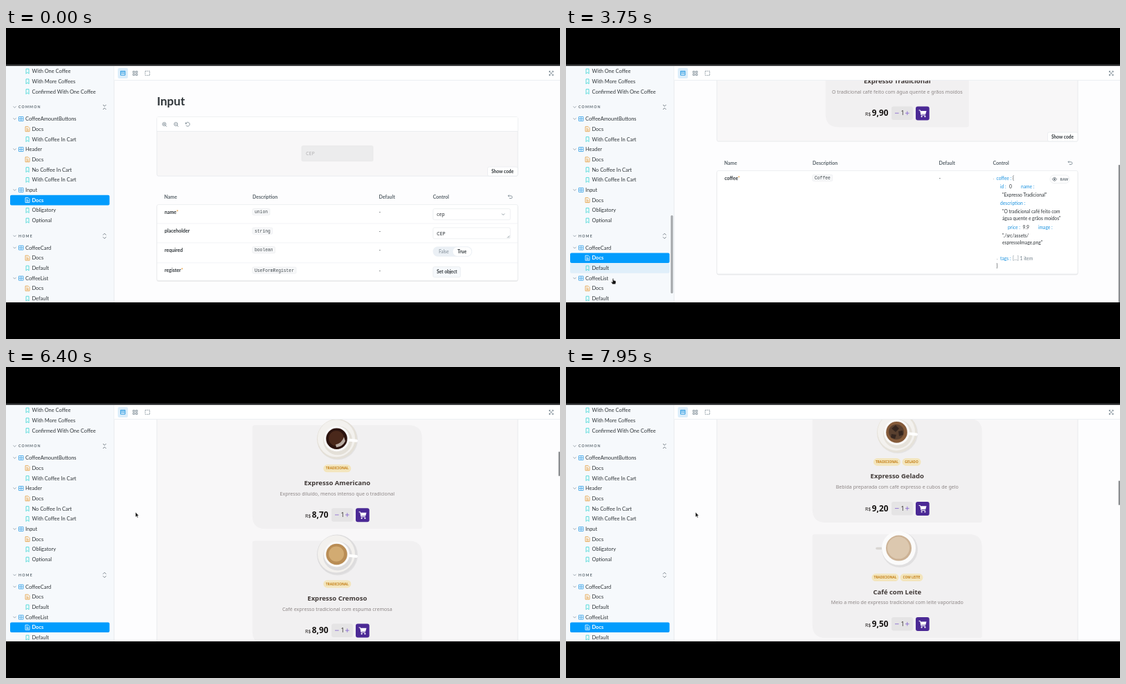
Recreate the animation shown at these times as an HTML page. Size 800 by 450 pixels, loop 8 s.

```html
<!DOCTYPE html>
<html lang="en">
<head>
<meta charset="utf-8">
<title>Component docs</title>
<style>
  html, body { margin: 0; width: 100%; height: 100%; overflow: hidden; background: #000; }
  svg { display: block; width: 100vw; height: 100vh; font-family: Lato, sans-serif; }
  text { white-space: pre; }
  .b { font-weight: 700; }
  .x { font-weight: 800; }
  .noto { font-family: "Noto Sans", sans-serif; }
  .mono { font-family: "Liberation Mono", monospace; }
  .mid { text-anchor: middle; }
  .line { fill: none; stroke-width: .8; }
  .back { fill: none; }
  .hover .back { fill: #e0effa; }
  .old .back { fill: #d0e9f7; }
  .on .back { fill: #029cfd; }
  .on text { fill: #fff; font-weight: 700; }
  .on .line { stroke: #fff; }
</style>
</head>
<body>
<svg id="stage" viewBox="0 0 800 450"></svg>
<script>
const LOOP = 8000;
const INK = '#2e3438', GRAY = '#73828c', BLUE = '#1ea7fd', EDGE = '#e3e6ea';

const rect = (x, y, w, h, fill, extra = '') =>
  `<rect x="${x}" y="${y}" width="${w}" height="${h}" fill="${fill}" ${extra}/>`;
const box = (x, y, w, h, fill, stroke = EDGE, r = 2) =>
  rect(x, y, w, h, fill, `stroke="${stroke}" stroke-width=".6" rx="${r}"`);
// y is the middle of the capital letters
const text = (x, y, s, size, fill = INK, cls = '', extra = '') =>
  `<text x="${x}" y="${y + size * .36}" font-size="${size}" fill="${fill}" class="${cls}" ${extra}>${s}</text>`;
const line = (d, stroke, extra = '') => `<path class="line" d="${d}" stroke="${stroke}" ${extra}/>`;
const circle = (x, y, r, fill, extra = '') => `<circle cx="${x}" cy="${y}" r="${r}" fill="${fill}" ${extra}/>`;
const group = (id, content, extra = '') => `<g id="${id}" ${extra}>${content}</g>`;

// ---- sidebar ----
const icons = {
  story: y => line(`M29 ${y - 3.3}h4v7l-2-2l-2 2z`, '#37d5d3'),
  docs: y => line(`M28 ${y - 3.5}h4l2 2v5h-6zM29.5 ${y - 1}h2M29.5 ${y + .6}h3M29.5 ${y + 2}h3`, '#e69d3c'),
  comp: y => line(`M10.5 ${y - 1.2}l2 2.2l2-2.2`, '#8d98a3') +
    line(`M18.5 ${y - 3}h6.5v6h-6.5zM21.75 ${y - 3}v6M18.5 ${y}h6.5`, '#2f9fe8')
};
const sections = [
  [62.5, ['story With One Coffee', 'story With More Coffees', 'story Confirmed With One Coffee']],
  [131.5, ['comp CoffeeAmountButtons', 'docs Docs', 'story With Coffee In Cart', 'comp Header', 'docs Docs',
    'story No Coffee In Cart', 'story With Coffee In Cart', 'comp Input', 'docs Docs', 'story Obligatory', 'story Optional']],
  [318, ['comp CoffeeCard', 'docs Docs', 'story Default', 'comp CoffeeList', 'docs Docs', 'story Default']]
];
const rows = sections.flatMap(([top, items]) => items.map((item, i) => {
  const cut = item.indexOf(' ');
  return { y: top + i * 14.7, kind: item.slice(0, cut), label: item.slice(cut + 1) };
}));
const INPUT_DOCS = 11, CARD_DOCS = 15, LIST_DOCS = 18;

const rowMarkup = ({ y, kind, label }) => `<g class="row">
  <rect class="back" x="6" y="${y - 7.3}" width="143.5" height="14.6" rx="2"/>
  ${icons[kind](y)}${text(kind == 'comp' ? 28 : 37.5, y, label, 7.46)}</g>`;
const heading = (y, label, open) =>
  line(`M10.5 ${y - 1.2}l2 2.2l2-2.2`, '#8d98a3') +
  text(18, y, label, 5.2, '#5c6870', 'b', 'letter-spacing="1.2"') +
  line(open ? `M140 ${y - 3.5}l2.3 2.3l2.3-2.3M140 ${y + 3.5}l2.3-2.3l2.3 2.3`
    : `M140 ${y - 1.4}l2.3-2.3l2.3 2.3M140 ${y + 1.4}l2.3 2.3l2.3-2.3`, '#5c6870');

const sidebar = rect(0, 55, 156, 342, '#f6f9fc') + rows.map(rowMarkup).join('') +
  heading(114.5, 'COMMON', true) + heading(301, 'HOME', false) +
  rect(151.3, 271, 3.2, 113, '#a6a9ac', 'id="sideThumb" rx="1.6"') + rect(155.7, 55, .7, 342, '#dfe4e9');

const toolbar = rect(156.4, 55, 643.6, 21, '#fff') + rect(156.4, 75.4, 643.6, .7, '#e1e6eb') +
  rect(161.5, 58, 14.5, 15, '#dbedfa', 'rx="2"') +
  line('M165.5 62.3h6.5v6h-6.5zM165.5 67l2-2l1.5 1.3l1.2-1l1.8 1.5M165.5 63.8h6.5', '#1e95e0') +
  line('M183.3 62.5h2.5v2.3h-2.5zM187.3 62.5h2.5v2.3h-2.5zM183.3 66.2h2.5v2.3h-2.5zM187.3 66.2h2.5v2.3h-2.5z', GRAY) +
  line('M201 62.3h6.5v6.3h-6.5z', GRAY, 'stroke-dasharray="1.6 1"') +
  line('M784.5 64.2v-1.8h1.8M790.2 64.2v-1.8h-1.8M784.5 66.8v1.8h1.8M790.2 66.8v1.8h-1.8M784.7 62.6l5.3 5.8M790 62.6l-5.3 5.8', GRAY);

// ---- documentation pages, in unscrolled coordinates ----
const zoom = (x, sign) => circle(x, 151.5, 2.5, 'none', `stroke="${GRAY}" stroke-width=".8"`) +
  line(`M${x + 1.8} 153.4l1.8 1.8M${x - 1.2} 151.5h2.4${sign}`, GRAY);

const page = (title, height, content = '') => {
  const end = 141 + height;
  return text(218, 118.5, title, 17.1, INK, 'b') +
    rect(217.6, 141.4, 521.8, height, '#000', 'opacity=".05" rx="3"') +
    box(218, 141, 521, height, '#f8f7f8') + rect(218.3, 141.3, 520.4, 20.7, '#fff') +
    rect(218, 161.7, 521, .6, EDGE) + zoom(228.5, 'M228.5 150.3v2.4') + zoom(245.3, '') +
    line('M259.3 149v2h2M259.6 150.7a2.9 2.9 0 1 1 .2 2.4', GRAY) + content +
    box(695.5, end - 13, 43.5, 13, '#fff') + text(701, end - 6.6, 'Show code', 6.6, INK, 'b');
};

const pill = (y, s) => box(356, y - 4.6, s.length * 3.8 + 6, 9.2, '#f7f8f9', '#e8eaec', 1.5) +
  text(359, y - .3, s, 6.33, '#444b50', 'mono');
const table = (top, height, lines, args) =>
  [[228.5, 'Name'], [356, 'Description'], [538.5, 'Default'], [616.5, 'Control']]
    .map(([x, s]) => text(x, top - 10.7, s, 7, '#5a646b', 'b')).join('') +
  line(`M725 ${top - 12.7}h4.2a1.8 1.8 0 0 1 0 3.7h-2.4M726.5 ${top - 14.2}l-1.5 1.5l1.5 1.5`, GRAY) +
  rect(217.5, top + .5, 522, height + 1, '#000', 'opacity=".07" rx="3"') +
  box(218, top, 521, height, '#fff') +
  lines.map(y => rect(218, y, 521, .6, '#e9ecef')).join('') +
  args.map(([y, name, type, star]) => text(229, y, name + (star ? '<tspan fill="#e69d3c">*</tspan>' : ''), 7, INK, 'b') +
    pill(y, type) + text(538.5, y + .5, '-', 7)).join('');

const inputPage = page('Input', 85.5,
    box(427, 183, 103, 22, '#ececed', '#e4e4e5', 1.5) + text(433, 194.3, 'CEP', 7.1, '#b3b2b4', 'noto')) +
  table(268, 110, [295, 323, 352], [[278.5, 'name', 'union', 1], [306, 'placeholder', 'string', 0],
    [333.5, 'required', 'boolean', 0], [363, 'register', 'UseFormRegister', 1]]) +
  box(616.7, 274, 111.5, 16, '#fff') + text(622, 282, 'cep', 7, INK, 'noto') +
  line('M716 281l2 2l2-2', GRAY) +
  box(616.7, 301.3, 111.5, 16, '#fff') + text(622, 309.5, 'CEP', 7, INK, 'noto') +
  line('M724 316l3-3M726 316l1-1', GRAY) +
  rect(616.5, 328.7, 56.5, 14.5, '#ebf0f5', 'rx="7"') + box(645, 329.2, 27.5, 13.5, '#fff', '#e8edf2', 6.7) +
  text(625, 336, 'False', 6.6, '#7f8b95') + text(652, 336, 'True', 6.6, INK, 'b') +
  box(616.7, 358, 39.5, 15, '#f6f9fc') + text(622, 365.5, 'Set object', 6.6, INK, 'b');

// ---- coffee cards ----
const coffees = [
  { name: 'Expresso Tradicional', about: 'O tradicional café feito com água quente e grãos moídos', price: '9,90',
    saucer: '#e2ded8', drink: '#35190f', foam: '#70401f' },
  { name: 'Expresso Americano', about: 'Expresso diluído, menos intenso que o tradicional', price: '8,70',
    saucer: '#e4e0d8', drink: '#2b130e', foam: '#4a281b', glare: 1 },
  { name: 'Expresso Cremoso', about: 'Café expresso tradicional com espuma cremosa', price: '8,90',
    saucer: '#dddcdd', drink: '#b98d55', foam: '#d2ab72' },
  { name: 'Expresso Gelado', about: 'Bebida preparada com café expresso e cubos de gelo', price: '9,20',
    saucer: '#e6e2da', drink: '#855b3a', foam: '#59402f', ice: 1, tag: 'GELADO' },
  { name: 'Café com Leite', about: 'Meio a meio de expresso tradicional com leite vaporizado', price: '9,50',
    drink: '#ccb295', foam: '#dcc8af', tag: 'COM LEITE' }
];

const cup = c => c.saucer
  ? circle(479, 21, 29, '#000', 'opacity=".06"') + circle(478, 20, 29, c.saucer) + circle(477, 19, 27, '#f3f1ee') +
    circle(479, 22, 21, c.saucer) +
    `<path d="M492 21l14 1.5" stroke="#fff" stroke-width="4" stroke-linecap="round"/>` +
    circle(477.5, 19.5, 18.5, '#fafafa') + circle(477.5, 19.5, 15.3, c.drink) + circle(477, 19, 11, c.foam) +
    (c.glare ? '<path d="M476 28q9-2 12-11l2 6q-4 8-13 9z" fill="#b9aca3"/>' : '') +
    (c.ice ? '<path d="M470 14l6-5l5 5l-5 5zM480 18l6-1l1 6l-6 2zM470 22l7 1l-2 6l-6-2z" fill="#35261f"/>' : '')
  : circle(482, 22, 26, '#000', 'opacity=".07"') +
    '<path d="M449 20.5h12" stroke="#d9d6d3" stroke-width="3.5" stroke-linecap="round"/>' +
    circle(480.5, 20, 24.5, '#fbfbfb') + circle(480.5, 20, 18.5, c.drink) + circle(480, 19.5, 16, c.foam);

const tag = (x, w, s) => rect(x - w / 2, 57, w, 11, '#f3e5bd', 'rx="5.5"') +
  text(x, 62.4, s, 4.75, '#c47f17', 'noto b mid');

// origin is the top edge of the card
const card = (c, top, width) => {
  const left = 478.3 - width / 2, right = left + width;
  return `<g transform="translate(0 ${top})">
  <path fill="#f1f0f1" d="M${left + 3} 0H${right - 19}q19 0 19 19V147q0 3-3 3H${left + 19}q-19 0-19-19V3q0-3 3-3z"/>
  ${cup(c)}` +
  (c.tag ? tag(c.tag.length > 6 ? 461 : 463.5, 39, 'TRADICIONAL') +
    tag(499, c.tag.length > 6 ? 33 : 27, c.tag) : tag(478.3, 40, 'TRADICIONAL')) +
  text(478.3, 83, c.name, 9.5, '#403937', 'noto b mid') + text(478.3, 98.7, c.about, 7.1, '#8d8686', 'noto mid') +
  text(432, 131, 'R$', 7, '#272221', 'noto') + text(441.8, 129.7, c.price, 11.8, '#161312', 'noto x') +
  rect(470, 120, 31, 19.5, '#e5e4e5', 'rx="3"') + line('M475 129.7h5.6M490 129.7h5.6M492.8 126.9v5.6', '#8260cf') +
  text(486, 129.8, '1', 8, '#272221', 'noto mid') + rect(505, 120, 19.7, 20, '#4b2995', 'rx="3"') +
  '<path d="M509.5 125.5h2l1.5 7h6" fill="none" stroke="#fff"/><path d="M511.8 126.4h8.7l-1.3 4.8h-6.5z" fill="#fff"/>' +
  circle(513.6, 134.6, 1.1, '#fff') + circle(518.4, 134.6, 1.1, '#fff') + '</g>';
};

const json = [
  [621.5, 415, 'coffee :', 'k'], [645, 415, '{'], [627, 426.5, 'id :', 'k'], [640, 426.5, '0'], [657, 426.5, 'name :', 'k'],
  [630, 439, '"Expresso Tradicional"'], [627, 451, 'description :', 'k'],
  [630, 462.5, '"O tradicional café feito com'], [630, 473, 'água quente e grãos moídos"'],
  [638, 485.5, 'price :', 'k'], [659.5, 485.5, '9.9'], [682, 485.5, 'image :', 'k'],
  [630, 497.5, '"./src/assets/'], [630, 508, 'espressoImage.png"'],
  [627, 530.5, 'tags :', 'k'], [645, 530.5, '[...] 1 item', 'g'], [621.5, 542, '}']
].map(([x, y, s, c]) => text(x, y, s, 6.7, c == 'k' ? '#1c93e0' : c == 'g' ? GRAY : INK)).join('');

const cardPage = page('CoffeeCard', 220, card(coffees[0], 190.5, 207)) +
  table(403.5, 149.5, [], [[414, 'coffee', 'Coffee', 1]]) + json +
  text(616.5, 415, '-', 5, GRAY) + text(622, 530.5, '·', 6, GRAY) +
  box(699, 410, 28, 11.5, '#fff', EDGE, 5.5) + text(713.5, 415.7, 'RAW', 5, '#5c6870', 'b') +
  line('M702.2 415.8q3.2-5 6.4 0q-3.2 5-6.4 0', '#5c6870') + circle(705.4, 415.8, 1.2, '#5c6870');
const listPage = page('CoffeeList', 2500, coffees.map((c, i) => card(c, 466 + (i - 1) * 167.2, 245)).join(''));

const stage = document.getElementById('stage');
stage.innerHTML = `<defs><clipPath id="window"><rect y="55" width="800" height="342"/></clipPath>
  <clipPath id="view"><rect x="156.4" y="76" width="643.6" height="321"/></clipPath></defs>` +
  rect(0, 0, 800, 450, '#000') + rect(0, 52.7, 800, 2.3, '#3b3c3e') +
  group('win', rect(0, 55, 800, 342, '#fdfdfe') + sidebar + toolbar +
    group('view-area', group('input', inputPage, 'transform="translate(0 -12.4)"') +
      group('cardEmpty', page('CoffeeCard', 63)) + group('card', cardPage) +
      group('listEmpty', page('CoffeeList', 63)) + group('list', listPage) +
      rect(797.8, 76, 2.2, 35, '#8b8d90', 'id="thumb"'), 'clip-path="url(#view)"') +
    `<g id="cursor" fill="#111" stroke="#fff" stroke-width=".5">
      <path id="arrow" d="M0 0V7.2L1.6 5.8L2.7 8.2L3.8 7.7L2.7 5.3H4.8Z"/>
      <path id="hand" d="M-.8 0h1.5v2.6l3.3.8v3l-.8 1.8h-4l-2.2-3.2l.8-.6l1.4 1z"/></g>`,
    'clip-path="url(#window)"');

// ---- motion ----
const clamp = u => Math.min(1, Math.max(0, u));
const ramp = (t, from, to) => clamp((t - from) / (to - from));
const smooth = u => u * u * (3 - 2 * u);
const easeOut = u => 1 - (1 - u) ** 3;

const path = [
  [50, 110, 403], [850, 75, 345], [1200, 75, 345], [1400, 72, 335], [1850, 72, 335], [2400, 300, 250],
  [3400, 300, 250], [3650, 72, 345], [3750, 68, 362.5], [3950, 68, 376], [4550, 68, 376],
  [5100, 198, 225], [5200, 198, 225], [5400, 187, 210]
];
function cursorAt(t) {
  const i = path.findIndex(p => p[0] > t);
  if (i < 0) return path.at(-1).slice(1);
  if (i == 0) return path[0].slice(1);
  const [t0, x0, y0] = path[i - 1], [t1, x1, y1] = path[i];
  const u = smooth(ramp(t, t0, t1));
  return [x0 + (x1 - x0) * u, y0 + (y1 - y0) * u];
}

const part = id => document.getElementById(id);
const show = (id, on) => part(id).style.display = on ? '' : 'none';
const rowNodes = [...document.querySelectorAll('.row')];

function draw(t) {
  const current = t < 1850 ? 'input' : t < 2100 ? 'cardEmpty' : t < 4600 ? 'card' : t < 5200 ? 'listEmpty' : 'list';
  for (const id of ['input', 'cardEmpty', 'card', 'listEmpty', 'list']) show(id, id == current);

  const cardScroll = 197 * easeOut(ramp(t, 2600, 3150));
  const listScroll = 389 * easeOut(ramp(t, 5850, 6600)) + 194.3 * easeOut(ramp(t, 6750, 7550)) +
    142.2 * easeOut(ramp(t, 7600, 7950));
  part('card').setAttribute('transform', `translate(0 ${-cardScroll})`);
  part('list').setAttribute('transform', `translate(0 ${-listScroll})`);
  show('thumb', current == 'card' || current == 'list');
  part('thumb').setAttribute('y', 76 + (current == 'card' ? cardScroll * .62 : listScroll * .1222));
  part('thumb').setAttribute('height', current == 'card' ? 199 : 35);

  const [x, y] = cursorAt(t), [hoverX, hoverY] = cursorAt(t - 60);
  const selected = t < 1500 ? INPUT_DOCS : t < 4400 ? CARD_DOCS : LIST_DOCS;
  rowNodes.forEach((node, i) => {
    const hovered = t > 100 && hoverX < 150 && Math.abs(hoverY - rows[i].y) < 7.3;
    const fading = (i == INPUT_DOCS && t >= 1500 && t < 1650) || (i == CARD_DOCS && t >= 4400 && t < 4550);
    node.setAttribute('class', 'row ' + (i == selected ? 'on' : fading ? 'old' : hovered ? 'hover' : ''));
  });
  part('sideThumb').style.opacity = ramp(t, 100, 250) - ramp(t, 2600, 2750) + ramp(t, 3550, 3650) - ramp(t, 5200, 5400);

  show('cursor', t >= 50);
  part('cursor').setAttribute('transform', `translate(${x} ${y})`);
  show('hand', x < 150);
  show('arrow', x >= 150);
}

function tick(now) {
  draw(now % LOOP);
  requestAnimationFrame(tick);
}
draw(0);
requestAnimationFrame(tick);
</script>
</body>
</html>
```
